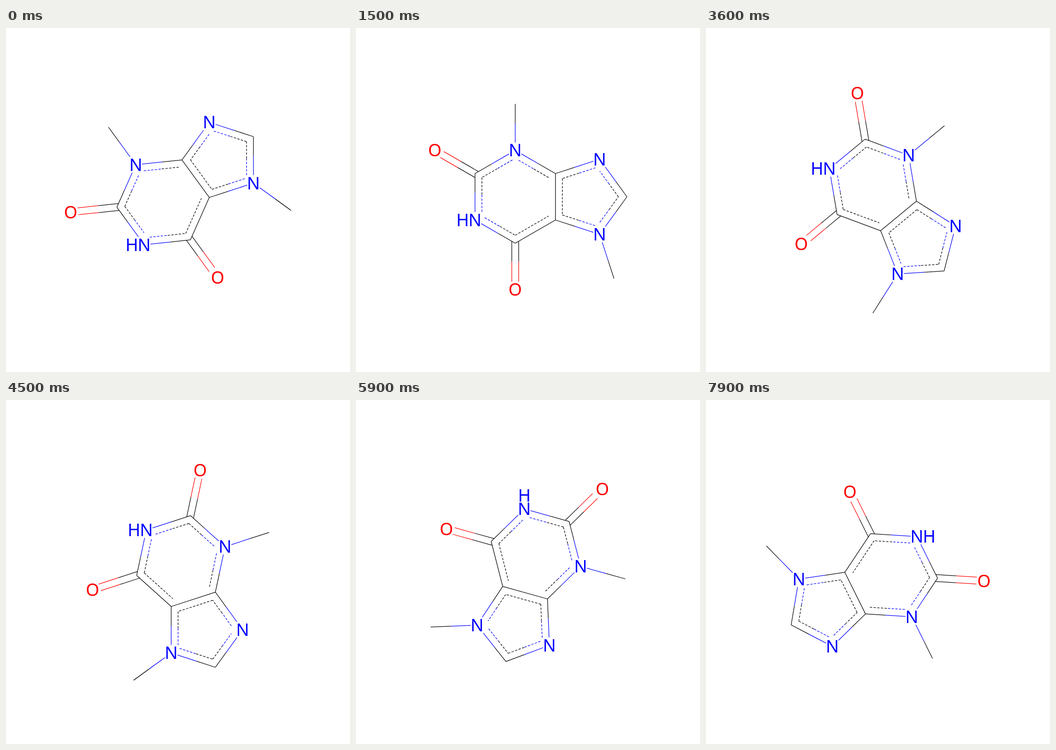
These frames come from a looping animation (748x748 px, 8000 ms). An HTML page:

```html
<!DOCTYPE html>
<html lang="en">
<head>
<meta charset="utf-8">
<title>Turning molecule</title>
<style>
  html, body { margin: 0; width: 100%; height: 100%; overflow: hidden; background: #fff; }
  svg { display: block; width: 100vw; height: 100vh; }
  line { stroke-width: 1.25; }
  .dash { stroke-dasharray: 5 3; }
  text { font: 37.5px "Noto Sans", "Open Sans", sans-serif; text-anchor: middle; }
</style>
</head>
<body>
<svg id="stage" viewBox="0 0 748 748"></svg>
<script>
const STEP_MS = 100, STEPS = 80, STEP_DEG = 2.4, START_DEG = -36;
const MID = 374, BOND = 101, GAP = 15;
const CAP = 26.8, H_SIDE = 26.8, H_UP = 29;
const RAD = Math.PI / 180;

// Half sizes of the glyph (ink) and of the area kept free of bonds (clear).
const LABELS = {
  N: { color: '#00f', ink: [10.4, 13.5], clear: [13.6, 17.2] },
  O: { color: '#f00', ink: [12.4, 14], clear: [15.8, 17.3] }
};

const polar = (r, deg, cx = 0) => [cx + r * Math.cos(deg * RAD), r * Math.sin(deg * RAD)];
const add = (p, q, k = 1) => [p[0] + q[0] * k, p[1] + q[1] * k];
const unit = (p, q) => {
  const d = add(q, p, -1), len = Math.hypot(...d);
  return [d[0] / len, d[1] / len];
};

const pentR = BOND / (2 * Math.sin(36 * RAD));
const pentX = BOND * Math.cos(30 * RAD) + pentR * Math.cos(36 * RAD);

const MODEL = {
  hex: [0, 0], pent: [pentX, 0],
  C4: polar(BOND, -30), C5: polar(BOND, 30), C6: polar(BOND, 90),
  N1: polar(BOND, 150), C2: polar(BOND, 210), N3: polar(BOND, 270),
  O6: polar(2 * BOND, 90), O2: polar(2 * BOND, 210), M3: polar(2 * BOND, 270),
  N7: polar(pentR, 72, pentX), C8: polar(pentR, 0, pentX), N9: polar(pentR, -72, pentX),
  M7: polar(pentR + BOND, 72, pentX)
};

// Half of the inner angle of each ring.
const HALF = { hex: 60, pent: 54 };
const RING_BONDS = [
  ['C4', 'N3', 'hex'], ['N3', 'C2', 'hex'], ['C2', 'N1', 'hex'],
  ['N1', 'C6', 'hex'], ['C6', 'C5', 'hex'],
  ['C4', 'C5', 'pent'], ['C5', 'N7', 'pent'], ['N7', 'C8', 'pent'],
  ['C8', 'N9', 'pent'], ['N9', 'C4', 'pent']
];
const METHYLS = [['N3', 'M3'], ['N7', 'M7']];
const CARBONYLS = [['C2', 'O2'], ['C6', 'O6']];

const label = name => LABELS[name[0]];
const color = name => label(name) ? label(name).color : '#000';

function line(p, q, stroke, cls) {
  const [x1, y1, x2, y2] = [...p, ...q].map(v => v.toFixed(2));
  return `<line x1="${x1}" y1="${y1}" x2="${x2}" y2="${y2}" stroke="${stroke}" class="${cls}"/>`;
}

function twoTone(p, q, a, b, cls = '') {
  if (color(a) === color(b)) return line(p, q, color(a), cls);
  const m = [(p[0] + q[0]) / 2, (p[1] + q[1]) / 2];
  return line(p, m, color(a), cls) + line(m, q, color(b), cls);
}

function glyph(char, p, fill) {
  return `<text x="${p[0].toFixed(2)}" y="${(p[1] + CAP / 2).toFixed(2)}" fill="${fill}">${char}</text>`;
}

// End of the bond a-b at a, kept clear of a's letter.
function bondEnd(pos, a, b) {
  if (!label(a)) return pos[a];
  const d = unit(pos[a], pos[b]), [w, h] = label(a).clear;
  return add(pos[a], d, Math.min(w / Math.abs(d[0]), h / Math.abs(d[1])));
}

function innerEnd(pos, a, b, ring) {
  if (!label(a)) {
    return add(pos[a], unit(pos[a], pos[ring]), GAP / Math.sin(HALF[ring] * RAD));
  }
  const mid = add(pos[a], add(pos[b], pos[a], -1), 0.5);
  return add(bondEnd(pos, a, b), unit(mid, pos[ring]), GAP);
}

// The hydrogen goes above when its side is within 20 degrees of vertical.
function hydrogenShift(deg) {
  const [x, y] = polar(1, deg + 150);
  if (Math.abs(x) < Math.sin(20 * RAD)) return [0, Math.sign(y) * H_UP];
  return [Math.sign(x) * H_SIDE, 0];
}

function pose(deg) {
  const c = Math.cos(deg * RAD), s = Math.sin(deg * RAD), pos = {};
  for (const [name, [x, y]] of Object.entries(MODEL)) pos[name] = [x * c - y * s, x * s + y * c];
  pos.H = add(pos.N1, hydrogenShift(deg));

  // Centre the drawing, letters included.
  const lo = [1e9, 1e9], hi = [-1e9, -1e9];
  for (const name in pos) {
    const ink = name === 'H' ? LABELS.N.ink : label(name) ? label(name).ink : [0, 0];
    for (const i of [0, 1]) {
      lo[i] = Math.min(lo[i], pos[name][i] - ink[i]);
      hi[i] = Math.max(hi[i], pos[name][i] + ink[i]);
    }
  }
  const shift = lo.map((v, i) => MID - (v + hi[i]) / 2);
  for (const name in pos) pos[name] = add(pos[name], shift);
  return pos;
}

function draw(deg) {
  const pos = pose(deg);
  let out = '';
  const solid = (a, b) => twoTone(bondEnd(pos, a, b), bondEnd(pos, b, a), a, b);

  for (const [a, b, ring] of RING_BONDS) {
    out += solid(a, b);
    out += twoTone(innerEnd(pos, a, b, ring), innerEnd(pos, b, a, ring), a, b, 'dash');
  }
  for (const [a, b] of METHYLS) out += solid(a, b);
  for (const [a, b] of CARBONYLS) {
    const d = unit(pos[a], pos[b]), side = [-d[1], d[0]];
    const from = add(pos[a], d, -GAP / 2 / Math.sqrt(3)), to = bondEnd(pos, b, a);
    for (const k of [-GAP / 2, GAP / 2]) out += twoTone(add(from, side, k), add(to, side, k), a, b);
  }
  for (const name in pos) if (label(name)) out += glyph(name[0], pos[name], color(name));
  return out + glyph('H', pos.H, LABELS.N.color);
}

const stage = document.getElementById('stage');
const start = performance.now();
let shown = -1;

function tick() {
  const step = Math.floor((performance.now() - start) / STEP_MS) % STEPS;
  if (step !== shown) {
    shown = step;
    stage.innerHTML = draw(START_DEG + step * STEP_DEG);
  }
  requestAnimationFrame(tick);
}
tick();
</script>
</body>
</html>
```
